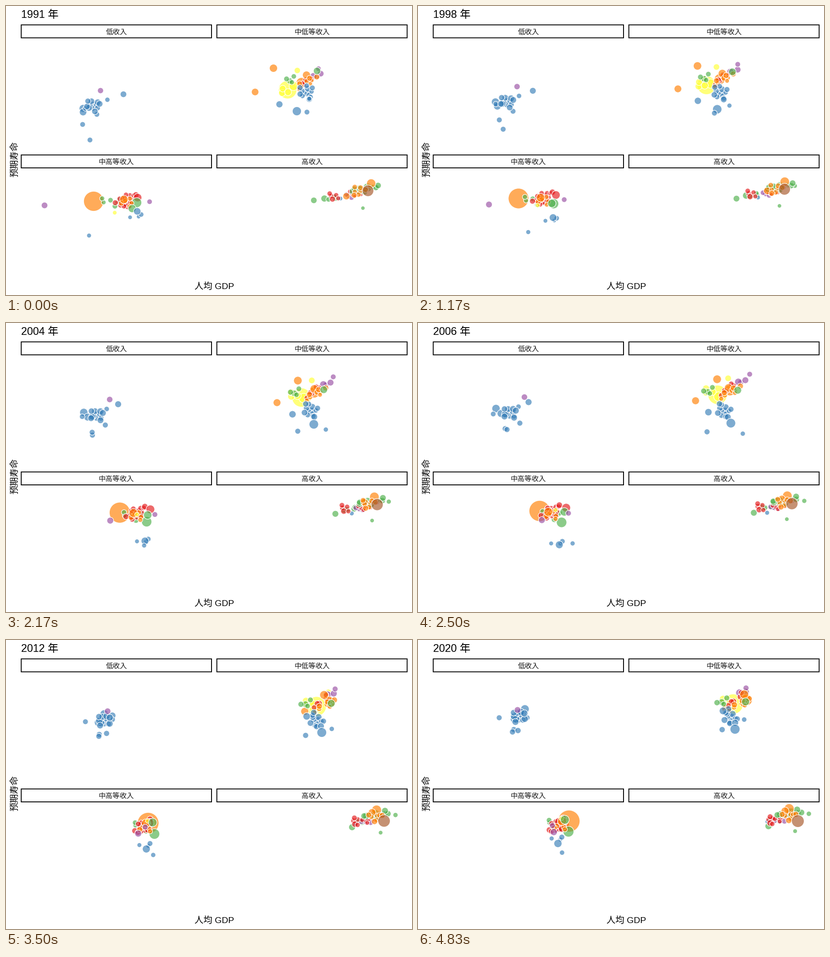
A matplotlib script for the animation above (5000 ms loop, 885 by 632 pixels).

```python
import matplotlib.pyplot as plt
import numpy as np
from matplotlib.animation import FuncAnimation
from matplotlib.colors import to_rgba
from matplotlib.patches import Rectangle

W, H, DPI = 885, 632, 100
LOOP, STEP = 5000, 20  # ms
FIRST, YEARS = 1991, 30
BASE = 19.44  # base text size in px
COLORS = dict(red="#E41A1C", blue="#377EB8", green="#4DAF4A", purple="#984EA3",
              orange="#FF7F00", yellow="#FFFF33", brown="#A65628")

plt.rcParams["font.family"] = ["Liberation Sans", "Noto Sans CJK JP"]
rng = np.random.default_rng(5)

# Shared pace: slow start, fast growth up to 2012, then levelling off.
PACE = np.interp(np.arange(YEARS), [0, 4, 11, 15, 21, 25, 29],
                 [0, 0.13, 0.27, 0.5, 0.85, 0.93, 1])
bubbles = []  # (colour, radius, position per year)


def px(size):
    return size * 72 / DPI


def route(start, middle, end):
    points = np.array([start, middle, end])
    return np.column_stack([np.interp(PACE, [0, 0.5, 1], axis) for axis in points.T])


def dot(color, radius, *stops):
    bubbles.append((color, radius, route(*stops)))


def swarm(color, n, radius, extent, *stops, tilt=0.0):
    """Fill a drifting, slowly turning ellipse evenly with bubbles."""
    centre = route(*stops)
    phase = rng.uniform(0, 2 * np.pi)
    for k in range(n):
        angle = phase + 2.4 * k + rng.normal(0, 0.3) + rng.uniform(-1, 1) * PACE
        reach = np.sqrt((k + 0.5) / n)
        dx = extent[0] * reach * np.cos(angle)
        dy = extent[1] * reach * np.sin(angle) - tilt * dx
        bubbles.append((color, radius * rng.uniform(0.86, 1.14),
                        centre + np.column_stack([dx, dy])))


# low income
dot("blue", 8, (168, 224), (170, 187), (233, 151))
dot("blue", 7.5, (168, 232), (181, 198), (210, 173))
dot("blue", 6.5, (256, 193), (241, 173), (228, 162))
dot("blue", 5.5, (183, 293), (190, 231), (209, 196))
dot("blue", 5.5, (167, 259), (194, 233), (206, 201))
dot("blue", 5.5, (198, 237), (222, 219), (218, 198))
dot("blue", 5, (221, 205), (219, 183), (238, 170))
dot("blue", 5.2, (173, 224), (164, 199), (177, 170))
swarm("blue", 12, 6, (16, 15), (189, 218), (199, 198), (219, 169))
dot("purple", 6, (206, 185), (232, 162), (217, 153))

# lower middle income
dot("orange", 11, (644, 168), (680, 147), (716, 131))
dot("yellow", 19.5, (614, 183), (653, 157), (687, 140))
dot("yellow", 9.3, (627, 175), (655, 161), (680, 148))
swarm("yellow", 3, 7, (12, 9), (604, 187), (631, 149), (670, 134))
dot("yellow", 6.2, (635, 141), (676, 121), (714, 112))
dot("orange", 7.5, (543, 188), (605, 170), (671, 150))
swarm("purple", 3, 6.3, (10, 5), (677, 152), (705, 127), (708, 113), tilt=0.4)
dot("purple", 5.3, (681, 137), (723, 112), (715, 105))
swarm("red", 5, 5.4, (20, 6), (652, 168), (676, 144), (693, 129), tilt=0.8)
dot("orange", 8.2, (655, 151), (677, 142), (715, 128))
swarm("orange", 8, 5, (24, 10), (656, 167), (682, 151), (702, 142), tilt=0.5)
dot("orange", 8.3, (583, 136), (652, 123), (711, 119))
swarm("green", 4, 5.6, (20, 8), (624, 160), (638, 147), (669, 133), tilt=0.4)
dot("green", 7.4, (678, 142), (697, 147), (714, 135))
swarm("blue", 13, 5.8, (17, 18), (655, 188), (667, 191), (681, 168))
dot("blue", 9.3, (634, 230), (682, 219), (691, 195))
dot("blue", 7, (596, 215), (633, 195), (665, 155))
dot("blue", 5.5, (656, 232), (630, 238), (663, 196))
dot("blue", 4.7, (661, 203), (708, 242), (711, 174))

# upper middle income
dot("red", 10.5, (266, 434), (290, 411), (318, 407))
dot("orange", 21.3, (191, 427), (265, 411), (329, 396))
swarm("green", 6, 5.3, (27, 12), (230, 428), (290, 420), (302, 403))
swarm("red", 16, 5.5, (25, 13), (261, 424), (291, 412), (307, 404), tilt=0.3)
dot("red", 8.5, (287, 419), (323, 404), (308, 398))
dot("green", 10.2, (285, 430), (313, 436), (328, 419))
swarm("orange", 5, 5, (19, 10), (264, 429), (291, 420), (308, 407))
dot("orange", 8.5, (257, 423), (284, 413), (314, 396))
dot("yellow", 4.3, (237, 452), (300, 409), (313, 390))
dot("green", 8.2, (275, 443), (319, 413), (320, 393))
dot("purple", 6.5, (84, 436), (270, 431), (296, 420))
dot("purple", 5.3, (313, 428), (328, 416), (293, 406))
swarm("blue", 3, 4.8, (18, 7), (282, 460), (303, 482), (303, 436))
dot("blue", 7.5, (286, 449), (308, 485), (305, 445))
dot("blue", 4.6, (181, 502), (337, 482), (314, 465))

# high income
dot("green", 6.4, (671, 425), (732, 415), (764, 407))
dot("green", 7, (694, 421), (750, 404), (787, 394))
swarm("green", 3, 5.6, (15, 5), (712, 421), (765, 402), (777, 391))
dot("green", 4, (778, 442), (804, 429), (822, 418))
dot("green", 4.6, (809, 396), (842, 389), (852, 380))
swarm("purple", 5, 5.2, (30, 8), (756, 412), (786, 400), (797, 391), tilt=0.4)
dot("blue", 4.4, (729, 421), (761, 415), (762, 397))
swarm("red", 5, 5.2, (14, 9), (713, 416), (745, 402), (769, 394))
swarm("red", 5, 4.6, (16, 7), (759, 410), (785, 402), (791, 392))
dot("green", 9, (788, 397), (788, 390), (813, 378))
swarm("green", 10, 5.8, (34, 7), (783, 400), (802, 388), (814, 379), tilt=0.2)
dot("orange", 9.4, (796, 388), (805, 378), (809, 369))
dot("orange", 7.3, (742, 416), (793, 385), (800, 374))
swarm("orange", 7, 5, (18, 12), (768, 404), (796, 391), (808, 383))
dot("brown", 12, (789, 404), (815, 395), (828, 396))

fig = plt.figure(figsize=(W / DPI, H / DPI), dpi=DPI, facecolor="white")
ax = fig.add_axes([0, 0, 1, 1])
ax.set(xlim=(0, W), ylim=(H, 0))
ax.axis("off")

strips = ["低收入", "中低等收入", "中高等收入", "高收入"]
for k, label in enumerate(strips):
    x, y = 33.2 + 426.4 * (k % 2), 41.3 + 284.4 * (k // 2)
    ax.add_patch(Rectangle((x, y), 414.8, 28.3, fill=False, ec="black",
                           lw=px(1.9), snap=False))
    ax.text(x + 207.4, y + 20.5, label, size=px(BASE * 0.8), color="#1a1a1a", ha="center")
ax.text(453.8, 618.5, "人均 GDP", size=px(BASE), ha="center")
ax.text(24.4, 335, "预期寿命", size=px(BASE), ha="center", va="baseline",
        rotation=90, rotation_mode="anchor")
title = ax.text(33, 26.3, "", size=px(BASE * 1.2))

radii = np.array([b[1] for b in bubbles])
tracks = np.array([b[2] for b in bubbles])
cloud = ax.scatter(tracks[:, 0, 0], tracks[:, 0, 1], linewidths=px(1.25),
                   facecolors=[to_rgba(COLORS[b[0]], 0.65) for b in bubbles],
                   edgecolors="white")


def update(i):
    year = int((i + 0.75) * STEP * YEARS / LOOP)
    title.set_text(f"{FIRST + year} 年")
    cloud.set_offsets(tracks[:, year])
    grown = radii * (1 + 0.1 * year / (YEARS - 1)) + 0.5
    cloud.set_sizes(px(2 * grown) ** 2)
    return cloud, title


anim = FuncAnimation(fig, update, frames=LOOP // STEP, interval=STEP,
                     repeat=True, repeat_delay=0)
plt.show()
```
